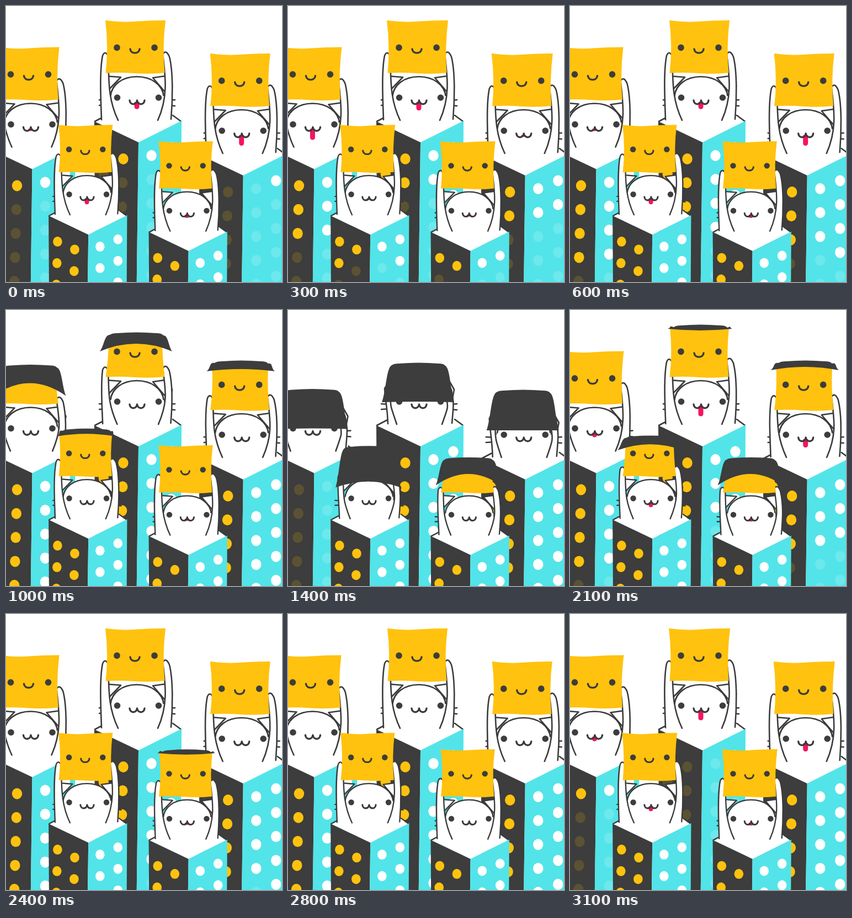
Recreate the animation shown at these times as an HTML page. Size 500 by 500 pixels, loop 3.2 s.

```html
<!DOCTYPE html>
<html lang="en">
<head>
<meta charset="utf-8">
<title>Cats in boxes</title>
<style>
  html, body { margin: 0; width: 100%; height: 100%; overflow: hidden; background: #fff; }
  svg { display: block; width: 100%; height: 100%; }
  .ink { stroke: #3a3a3a; stroke-width: 2.6; stroke-linecap: round; stroke-linejoin: round; fill: none; }
  .white { fill: #fff; }
  .bold { stroke-width: 3.4; }
  .dark { fill: #3c3d3c; }
  .yellow { fill: #ffc20e; }
  .cyan { fill: #52e4e9; }
  .pink { fill: #f5145f; }
</style>
</head>
<body>
<svg id="stage" viewBox="0 0 500 500"></svg>
<script>
const LOOP = 3200, STEP = 100, GLOW = 1600, LICK = 600;
const stage = document.getElementById('stage');

// Front corner of each box, scale, order of the wave, tongue [mean, swing, peak time]
const cats = [
  { x: 240, y: 247, s: 1, wave: 1, lick: [14, 6, 430] },
  { x: 47.5, y: 295.5, s: 1, wave: 0, lick: [12, 8, 300] },
  { x: 429.7, y: 307, s: 1, wave: 2, lick: [11, 8, 0] },
  { x: 149.2, y: 414.2, s: .9, wave: 3, lick: [7.5, 4.5, 0] },
  { x: 330.6, y: 443.8, s: .9, wave: 4, lick: [5, 1.5, 0] }
];

// Cloth per step: top, middle of lower edge, ends of lower edge
const FOLD = [
  [0, 0, 0], [1, 11, 16], [7, 22, 26], [16, 36, 50], [26, 59, 82],
  [36, 107, 119], [60, 133, 133], [71, 141, 142], [70, 141, 142],
  [60, 133, 135], [35, 117, 121], [26, 59, 82], [15, 32, 44],
  [7, 18, 24], [2, 12, 9], [0, 0, 0]
];

const mod = (a, n) => ((a % n) + n) % n;
const mix = (a, b, k) => a + (b - a) * k;

function windows() {
  const cols = [[178, 261, 0], [212.5, 277, 1], [263.5, 271, 1], [299.5, 256.500, 0]];
  let out = '';
  cols.forEach(([x, y, inner], c) => {
    for (let r = 0; r < 6; r++) {
      const px = x - (c < 2 ? 1.2 * r : 0), py = y + 43.3 * r;
      out += `<ellipse class="win ${c < 2 ? 'yellow' : 'white'}" cx="${px}" cy="${py}"
        rx="9.2" ry="10" data-on="${200 * r + 100 * inner}"/>`;
    }
  });
  return out;
}

function face(y, left, right) {
  return `<circle class="dark" cx="${left}" cy="${y}" r="5.8"/><circle class="dark" cx="${right}" cy="${y}" r="5.8"/>`;
}

function build(cat) {
  const g = document.createElementNS('http://www.w3.org/2000/svg', 'g');
  g.setAttribute('transform', `translate(${cat.x} ${cat.y}) scale(${cat.s}) translate(-240 -247)`);
  g.innerHTML = `
    <path class="white" d="M160 209L182 198H302L318 209L240 247Z"/>
    <path class="ink" d="M161 209L182 198M302 198L317 209"/>
    <path class="ink" d="M169 170L184 171M169 180L184 179M294 171L306 170M294 180L306 181"/>
    <path class="ink white" d="M208 129L182 127L178 160ZM266 130L291 126.500L301 144L297 166Z"/>
    <path class="white" d="M180 215V170H296V215L240 247Z"/>
    <path class="ink white" d="M189 165C191 142 211 128 237 128S284 142 286 165"/>
    <path class="white" d="M189 163H286V216L240 247L189 216Z"/>
    ${face(166, 201.5, 276.5)}
    <path class="tongue pink"/>
    <path class="ink bold" d="M224 171C225 180 236 180 237.500 171C239 180 250 180 251 171"/>
    <path class="arm ink white"/><path class="arm ink white"/>
    <path class="dark" d="M160 209L240 247L236 560H162Z"/>
    <path class="cyan" d="M240 247L318 208L316 560H236Z"/>
    ${windows()}
    <path class="sign yellow"/>
    <g class="smile">${face(75.4, 201, 269)}
      <path class="ink bold" d="M225 78C226 87.500 241 87.500 242 78"/></g>
    <path class="cloth dark"/>`;
  stage.append(g);
  const one = name => g.querySelector('.' + name);
  Object.assign(cat, {
    tongue: one('tongue'), sign: one('sign'), smile: one('smile'), cloth: one('cloth'),
    arms: g.querySelectorAll('.arm'), wins: g.querySelectorAll('.win')
  });
}

function signPath(top, inset, w) {
  const l = 180 + inset - w, r = 289 - inset + w, mid = (top + 122) / 2;
  return `M${l} ${top}Q208 ${top + 4} 234 ${top + 2}T${r} ${top}
    Q${283 + w} ${mid} 287.500 121Q262 124 234 122T180.500 121.500Q${186 - w} ${mid} ${l} ${top}Z`;
}

function clothPath([a, m, e]) {
  const out = Math.min(9, a * .6 + 1), l = 179 - out, r = 292 + out;
  const top = 25 + a, end = 25 + e, h = end - top;
  const tl = 183, tr = 289;
  return `M${l} ${end}C${l + 8} ${end - h * .3} ${tl - 5} ${top + h * .12} ${tl + 5} ${top + 4}
    Q${tl + 9} ${top + 1} ${tl + 18} ${top + 1}Q236 ${top - 2} ${tr - 16} ${top + 1}
    Q${tr - 7} ${top + 1} ${tr - 4} ${top + 5}C${tr + 5} ${top + h * .14} ${r - 7} ${end - h * .3} ${r} ${end}
    Q236 ${25 + 2 * m - e} ${l} ${end}Z`;
}

function drawArms(arms, a) {
  const h = 84 + 26 * Math.pow(a / 26, .7), k = Math.min(1, a / 60);
  const lo = mix(173, 181, k), ro = mix(299, 297, k);
  arms[0].setAttribute('d', `M${lo} 206C${lo - 1} 175 ${lo - 4} ${h + 35} 175 ${h + 6}Q179 ${h - 4} 185 ${h + 6}
    C187 ${h + 45} 183 165 ${mix(203, 197, k)} 207`);
  arms[1].setAttribute('d', `M${ro} 205C${ro + 3} 170 ${ro + 4} ${h + 35} 296 ${h + 8}Q290 ${h - 6} 284 ${h + 3}
    C289 ${h + 45} 294 165 ${mix(275, 279, k)} 207`);
}

function tonguePath(len) {
  if (len <= 0) return '';
  const c = Math.min(5, len), y = 174 + len - c;
  return `M232.500 174V${y}Q232.500 ${y + c} 237 ${y + c}Q241.500 ${y + c} 241.500 ${y}V174Z`;
}

function draw(cat, t) {
  const i = mod(t - 600 - 100 * cat.wave, LOOP) / STEP;
  const fold = FOLD[i] || FOLD[0], a = fold[0];
  drawArms(cat.arms, a);

  const flat = a === 0;
  const top = flat ? 26 : 25 + (a + fold[1]) / 2;
  const boil = flat && (t / STEP) % 2 ? 1 : 0;
  cat.sign.setAttribute('d', a < 34 ? signPath(top, Math.min(6, a * .5), boil) : '');
  cat.smile.style.display = a < 20 ? '' : 'none';
  cat.cloth.setAttribute('d', flat ? '' : clothPath(fold));

  const u = t % GLOW, [mean, swing, peak] = cat.lick;
  const licking = u < (cat.wave === 4 ? 1100 : 700) || u >= 1500;
  const phase = 2 * Math.PI * (mod(u + 100, GLOW) - 100 - peak) / LICK;
  cat.tongue.setAttribute('d', tonguePath(licking ? mean + swing * Math.cos(phase) : 0));

  const lit = mod(t - 1400 - 100 * cat.wave, GLOW);
  cat.wins.forEach(w => w.setAttribute('opacity', lit >= +w.dataset.on ? 1 : .16));
}

cats.forEach(build);
const start = performance.now();
function tick() {
  const t = Math.floor(mod(performance.now() - start, LOOP) / STEP) * STEP;
  cats.forEach(cat => draw(cat, t));
  requestAnimationFrame(tick);
}
tick();
</script>
</body>
</html>
```
